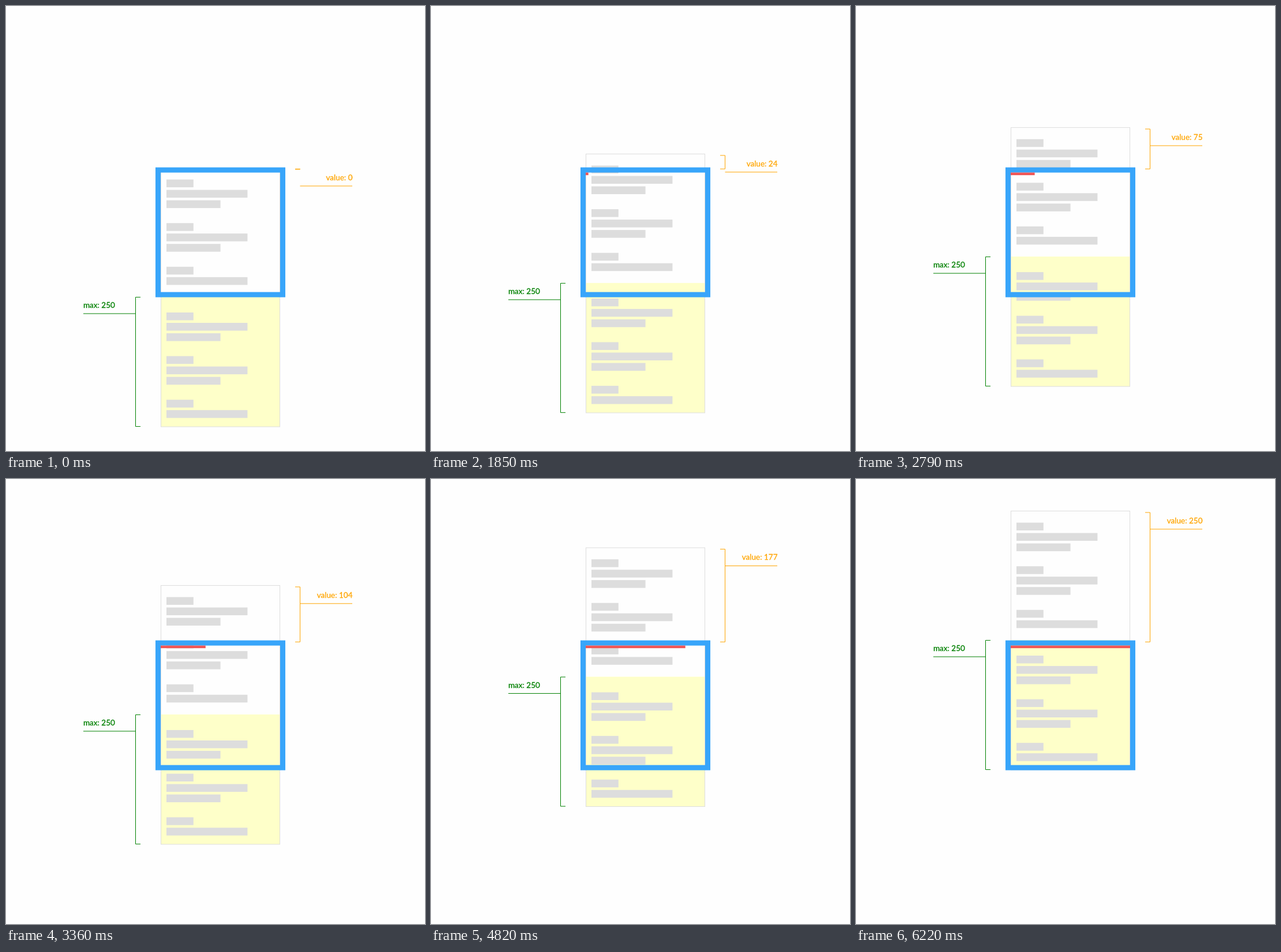
Animation, 726 px wide and 771 px high, one loop 8 s. Source, as an HTML page:

```html
<!DOCTYPE html>
<html lang="en">
<head>
<meta charset="utf-8">
<title>Scroll progress</title>
<style>
  html, body { margin: 0; width: 100%; height: 100%; overflow: hidden; background: #fefefe; }
  svg { display: block; width: 726px; height: 771px; }
  text { font: 13.5px Lato, "Open Sans", sans-serif; stroke-width: 0.3; }
  path { stroke-width: 1; }
  .max { fill: #008000; stroke: #008000; }
  .value { fill: #ffa500; stroke: #ffa500; }
  path.max, path.value { fill: none; }
</style>
</head>
<body>
<svg viewBox="0 0 726 771">
  <g id="page">
    <rect x="268" y="504" width="207" height="225" fill="#feffc9"/>
    <g id="rows" fill="#ddd"></g>
    <rect x="268.5" y="280.5" width="206" height="448.5" fill="none" stroke="#ddd"/>
    <path class="max" d="M233 504.5H224.5V728.5H233M134 533H224.5"/>
    <text class="max" x="134" y="523">max: 250</text>
  </g>
  <rect x="263.5" y="284.1" width="216" height="216" fill="none" stroke="#38a5fa" stroke-width="9"/>
  <rect id="bar" x="268" y="288.6" height="4.5" fill="#f05656"/>
  <g id="marker" class="value">
    <path id="bracket" class="value"/>
    <path class="value" d="M509.5 311.9H600"/>
    <text id="label" x="600.5" y="301.7" text-anchor="end"></text>
  </g>
</svg>
<script>
const LOOP = 8000;
const START = 1366;       // first scroll tick, ms
const TICK = 142.4;       // time between ticks, ms
const MAX = 250;          // full scroll distance
const SPEED = 7.266;      // distance per tick
const SCALE = 0.9;        // stage pixels per unit of distance

const $ = id => document.getElementById(id);

// cubic-bezier(.42, 0, .58, 1), solved by bisection
function easeInOut(x) {
  let low = 0, high = 1;
  for (let i = 0; i < 24; i++) {
    const s = (low + high) / 2, r = 1 - s;
    if (1.26 * s * r * r + 1.74 * s * s * r + s * s * s < x) low = s;
    else high = s;
  }
  return low * low * (3 - 2 * low);
}

function addRows() {
  const widths = [46.8, 140.4, 93.6];
  for (const top of [300.6, 531]) {
    for (let block = 0; block < 3; block++) {
      widths.slice(0, block < 2 ? 3 : 2).forEach((width, line) => {
        const row = document.createElementNS("http://www.w3.org/2000/svg", "rect");
        const box = { x: 278, y: top + block * 75.6 + line * 18, width, height: 13.5 };
        for (const name in box) row.setAttribute(name, box[name]);
        $("rows").append(row);
      });
    }
  }
}

function draw(time) {
  const tick = Math.floor((time - START) / TICK);
  const travel = offset => tick < 0 ? 0 : Math.min(MAX, offset + SPEED * tick);
  const distance = travel(5);
  const shown = Math.floor(travel(3.05));   // the label trails the page a little
  const shift = distance * SCALE;
  const move = `translate(0 ${-shift})`;

  $("page").setAttribute("transform", move);
  $("marker").setAttribute("transform", move);
  $("bracket").setAttribute("d", `M501 283H509.5V${282.3 + shift}H501`);
  $("bar").setAttribute("width", 207 * easeInOut(distance / MAX));
  $("label").textContent = `value: ${shown}`;
}

addRows();
const origin = performance.now();
function frame() {
  draw((performance.now() - origin) % LOOP);
  requestAnimationFrame(frame);
}
frame();
</script>
</body>
</html>
```
